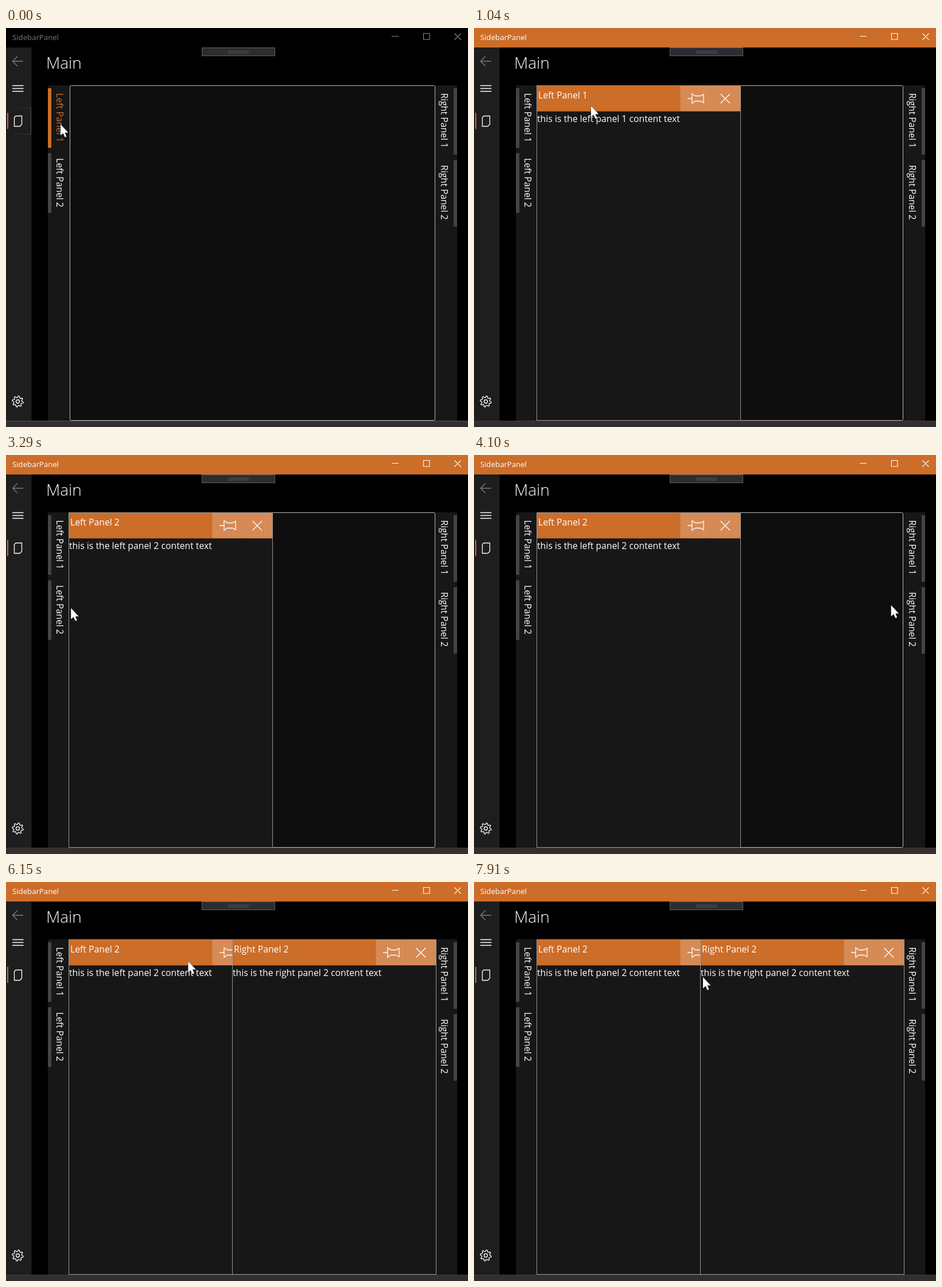
An HTML page that plays this animation: 805x696 px, repeating every 7.99 s.

```html
<!DOCTYPE html>
<html lang="en">
<head>
<meta charset="utf-8">
<title>SidebarPanel</title>
<style>
  html, body { margin: 0; width: 100%; height: 100%; overflow: hidden; background: #000; }
  svg { display: block; width: 805px; height: 696px; }
  text { font-family: "Open Sans", "Noto Sans", sans-serif; font-size: 15.75px; fill: #fff; white-space: pre; }
  .line { fill: none; stroke: #fff; stroke-width: 1.3; }
</style>
</head>
<body>
<svg viewBox="0 0 805 696" xmlns="http://www.w3.org/2000/svg">
  <defs>
    <radialGradient id="reveal" gradientUnits="userSpaceOnUse" cx="95" cy="168" r="84">
      <stop offset=".55" stop-color="#fff" stop-opacity=".24"/>
      <stop offset="1" stop-color="#fff" stop-opacity="0"/>
    </radialGradient>
  </defs>
  <rect width="805" height="696"/>

  <!-- title bar -->
  <rect id="bar" width="805" height="34"/>
  <text id="caption" x="11" y="20.5" style="font-size:13.2px">SidebarPanel</text>
  <path id="buttons" class="line" style="stroke-width:1.1" d="M672 14.5h12M727.5 9.5h10.500v10.500h-10.500zM781.500 9.500l11 11m0-11l-11 11"/>

  <!-- navigation pane -->
  <rect y="34" width="44.5" height="651" fill="#1e1e1e"/>
  <path class="line" style="stroke:#7c7c7c" d="M30 58H11.500M20 49.500L11.500 58l8.500 8.500"/>
  <path class="line" d="M11 100.500h19.500m-19.500 5h19.500m-19.500 5h19.500"/>
  <path id="glow" fill="none" stroke="url(#reveal)" d="M0 139H43.500V185H0"/>
  <rect x="2" y="148" width="2" height="28" fill="#cc6d29"/>
  <path class="line" d="M17 153.500H27.500V168L24 171.500H14.500V156Z"/>
  <path id="gear" class="line" stroke-linejoin="round"/>
  <circle class="line" cx="20.5" cy="651.5" r="3"/>

  <text x="70" y="71" style="font-size:28px;font-weight:350">Main</text>

  <!-- debug toolbar -->
  <rect x="341.5" y="34.5" width="127" height="14" fill="#2d2d30" stroke="#606064"/>
  <path d="M387 40.500h36m-36 3h36" stroke="#5c5c60"/>

  <!-- work area -->
  <path d="M73 100h39v585h-39zm674 0h39v585h-39z" fill="#171717"/>
  <rect x="111.5" y="100.5" width="636" height="584" rx="2" fill="#0e0e0e" stroke="#bababa"/>
  <g id="tabs"></g>
  <g id="panels"></g>

  <rect y="686" width="805" height="10" fill="#302f32"/>
  <rect id="edge" y="685" width="805" height="1"/>

  <path id="cursor" fill="#fff" stroke="#000" stroke-width=".8" paint-order="stroke"
    d="M0 0V19.500L4.500 15.500L7.600 22.500L10.600 21.200L7.600 14.400H13.500Z"/>
  <circle id="click" r="14.2" fill="#fff000" fill-opacity=".6"/>
</svg>
<script>
const ORANGE = '#cc6d29', LOOP = 7990;
const $ = id => document.getElementById(id);
const set = (el, attrs) => { for (const k in attrs) el.setAttribute(k, attrs[k]); };
const show = (el, on) => set(el, { visibility: on ? 'visible' : 'hidden' });

function add(parent, tag, attrs, label) {
  const el = document.createElementNS('http://www.w3.org/2000/svg', tag);
  set(el, attrs);
  if (label) el.textContent = label;
  parent.appendChild(el);
  return el;
}

// Returns a function that lights the tab while the pointer is over it.
function makeTab(side, number) {
  const right = side === 'Right', h = right ? 116 : 104;
  const y = 105 + (number - 1) * (h + 9.5), x = right ? 749 : 73;
  const bar = add($('tabs'), 'rect', { x: right ? 780 : 73, y, width: 6, height: h });
  const text = add($('tabs'), 'text', {
    transform: `translate(${right ? 758 : 88} ${y + 8.5}) rotate(90)`
  }, `${side} Panel ${number}`);
  return (px, py) => {
    const over = px >= x && px < x + 36 && py >= y && py < y + h;
    set(bar, { fill: over ? ORANGE : '#444' });
    text.style.fill = over ? ORANGE : '#fff';
  };
}

function makePanel(dx) {
  const g = add($('panels'), 'g', { transform: `translate(${dx} 0)` });
  add(g, 'rect', { x: 109.5, y: 100.5, width: 355, height: 584, fill: '#171717', stroke: '#969696' });
  add(g, 'rect', { x: 110, y: 101, width: 354, height: 44.5, fill: ORANGE });
  for (const x of [359.5, 411.7])
    add(g, 'rect', { x, y: 101, width: 52.3, height: 44, rx: 2, fill: '#d68a55' });
  add(g, 'path', { class: 'line', d: 'M372 123h8M380 114.5V131.5L385.5 127.5H394.5L400 130.5V115.5L394.5 118.5H385.5Z' });
  add(g, 'path', { class: 'line', d: 'M429.5 115l16.5 16.5m0-16.5l-16.5 16.5' });
  const title = add(g, 'text', { x: 112, y: 122.8 });
  const body = add(g, 'text', { x: 110, y: 164 });
  return name => {
    show(g, !!name);
    title.textContent = name;
    body.textContent = `this is the ${name.toLowerCase()} content text`;
  };
}

function gearPath(teeth) {
  const pts = [];
  for (let i = 0; i < teeth * 4; i++) {
    const r = i % 4 < 2 ? 9.6 : 7;
    const a = (i + .5) * Math.PI / (teeth * 2);
    pts.push((20.5 + r * Math.cos(a)).toFixed(2) + ' ' + (651.5 + r * Math.sin(a)).toFixed(2));
  }
  return 'M' + pts.join('L') + 'Z';
}

// Pointer strokes: start and end time, end point, optional curve handles.
const strokes = [
  { t: [760, 1640], to: [124, 283], h1: [209, 72], h2: [370, 200] },
  { t: [1850, 2160], to: [84, 272] },
  { t: [3030, 3690], to: [560, 250], h1: [84, 272], h2: [83, 259] },
  { t: [3800, 4730], to: [766, 290], h1: [800, 250], h2: [810, 300] },
  { t: [5600, 6420], to: [273, 335], h1: [500, 140], h2: [223, -9] },
  { t: [6420, 6960], to: [306, 332] },
  { t: [7050, 7910], to: [399, 166], h1: [480, 330], h2: [540, 215] }
];

function pointer(t) {
  let p = [95, 168];
  for (const { t: [a, b], to, h1 = p, h2 = to } of strokes) {
    if (t <= a) break;
    const u = Math.min(1, (t - a) / (b - a)), v = 1 - u;
    p = p.map((s, i) => v * v * v * s + 3 * u * v * (v * h1[i] + u * h2[i]) + u * u * u * to[i]);
  }
  return p;
}

set($('gear'), { d: gearPath(8) });
const tabs = ['Left', 'Right'].flatMap(side => [1, 2].map(n => makeTab(side, n)));
const leftPanel = makePanel(0), rightPanel = makePanel(285);

// Each click opens its panel when the mouse button is released.
const clicks = [
  { down: 240, up: 410, open: leftPanel, name: 'Left Panel 1' },
  { down: 2460, up: 2630, open: leftPanel, name: 'Left Panel 2' },
  { down: 4880, up: 4970, open: rightPanel, name: 'Right Panel 2' }
];

function draw(t) {
  const active = t >= 320, [x, y] = pointer(t);
  set($('bar'), { fill: active ? ORANGE : '#000' });
  set($('edge'), { fill: active ? '#58351d' : '#505050' });
  $('caption').style.fill = active ? '#fff' : '#777';
  $('buttons').style.stroke = active ? '#fff' : '#8c8c8c';
  show($('glow'), t < clicks[0].up);
  for (const light of tabs) light(x, y);
  for (const panel of [leftPanel, rightPanel]) {
    const last = clicks.filter(c => c.open === panel && t >= c.up).pop();
    panel(last ? last.name : '');
  }
  set($('cursor'), { transform: `translate(${x.toFixed(1)} ${y.toFixed(1)})` });
  set($('click'), { cx: x, cy: y });
  show($('click'), clicks.some(c => t >= c.down && t < c.up));
}

const start = performance.now();
function tick() {
  draw((performance.now() - start) % LOOP);
  requestAnimationFrame(tick);
}
tick();
</script>
</body>
</html>
```
